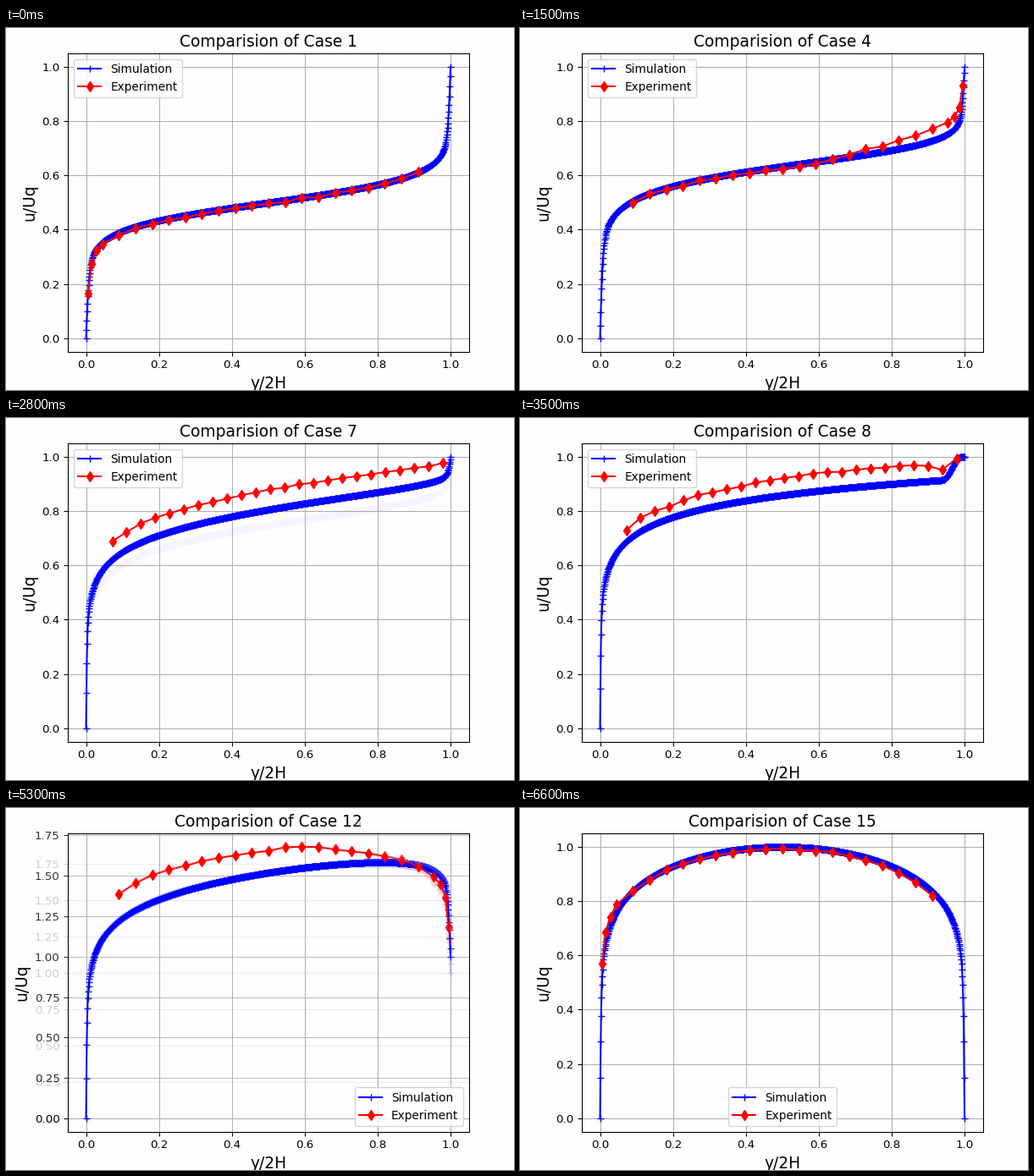
A matplotlib script that plays this animation: 600 by 428 pixels, repeating every 6700 ms.

```python
import numpy as np
import matplotlib.pyplot as plt
from matplotlib.animation import FuncAnimation

W, H, DPI = 600, 428, 96
FRAMES, STEP = 67, 100
CASES = 15
FIRST_CUT, PERIOD, FADE = 75, 440, 180  # ms
PAPER = "#fefdff"

# Key cases: core speed, core slope, then the experiment's
# deviation at the stations in BIAS_AT. Other cases lie in between.
BIAS_AT = [0, 0.1, 0.6, 0.9, 1]
KEYS = {
    1: (0.5, 0, -0.01, -0.006, -0.004, 0, 0),
    4: (0.654, 0, 0, -0.006, -0.006, 0.042, 0.05),
    7: (0.825, 0.055, 0.06, 0.066, 0.073, 0.068, 0.05),
    8: (0.92, 0, 0.03, 0.045, 0.064, 0.062, -0.01),
    10: (0.98, 0.12, 0.04, 0.072, 0.034, -0.03, 0),
    11: (1.165, 0.16, 0.06, 0.122, 0.1, 0.005, 0),
    12: (1.57, 0.21, 0.13, 0.168, 0.13, 0.004, -0.08),
    14: (1.95, 0.25, 0.16, 0.206, 0.159, 0.005, -0.1),
    15: (1.07, 0, 0.05, -0.005, -0.008, -0.018, 0),
}


def smoothstep(s):
    s = np.clip(s, 0, 1)
    return s * s * (3 - 2 * s)


def wall(y, lam):
    """Log-law layer rising from 0 at the wall to 1 at y = 1."""
    return (1 + 0.0957 * np.log(y + 1e-9)) * (1 - np.exp(-y / lam))


def simulation(k, y):
    a, c = params(k)[:2]
    lam = np.interp(k, [1, 4, 7], [0.0051, 0.0044, 0.0016])
    if k == CASES:  # channel flow, both walls at rest
        bulge = 4 * (1 - 0.868 * a) * y * (1 - y)
        return a * (wall(y, 0.0019) - 1 + wall(1 - y, 0.0019)) + bulge
    if k == 8:
        top = smoothstep((y - 0.94) / 0.05)
    else:
        top = 1 - wall(1 - y, 0.0045)
    return a * wall(y, lam) + c * y + (1 - a - c) * top


def params(k):
    return [np.interp(k, list(KEYS), col) for col in zip(*KEYS.values())]


def stations(k):
    if 6 <= k <= 8:
        return np.linspace(0.072, 0.978, 24)
    mid = np.linspace(0.09, 0.911, 19)
    if k in (3, 4, 5, 12, 13, 14):
        return np.r_[mid, 0.953, 0.973, 0.986, 0.995]
    return np.r_[0.006, 0.015, 0.028, 0.045, mid]


def experiment(k, y):
    return simulation(k, y) + np.interp(y, BIAS_AT, params(k)[2:])


def legend_place(k):
    if k <= 10:
        return "upper left"
    return "lower right" if k < CASES else "lower center"


plt.rcParams["font.family"] = "DejaVu Sans"
fig = plt.figure(figsize=(W / DPI, H / DPI), dpi=DPI, facecolor=PAPER)
LEFT, RIGHT, TOP, BOTTOM = 73, 546.6, 29.9, 382.9
BOX = [LEFT / W, 1 - BOTTOM / H, (RIGHT - LEFT) / W, (BOTTOM - TOP) / H]
rng = np.random.default_rng(4)


def make_case(k):
    ax = fig.add_axes(BOX, label=f"case {k}", facecolor=PAPER)
    # full-stage backing, so that a fade covers the whole picture
    ax.add_artist(plt.Rectangle((0, 0), 1, 1, transform=fig.transFigure,
                                color=PAPER, clip_on=False, zorder=-5))
    y = np.linspace(0, 1, 1001)
    u = simulation(k, y)
    ys = stations(k)
    us = experiment(k, ys)
    peak = max(u.max(), us.max())
    scatter = rng.normal(0, 0.002 * peak, ys.size)
    ax.plot(y, u, "b+-", label="Simulation")
    ax.plot(ys, us + scatter, "rd-", ms=6.5, label="Experiment")
    ax.set_ylim(-0.05 * peak, 1.05 * peak)
    ax.set_title(f"Comparision of Case {k}", fontsize=14)
    ax.set_xlabel("y/2H", fontsize=14)
    ax.set_ylabel("u/Uq", fontsize=14)
    ax.grid(True)
    ax.legend(loc=legend_place(k), fontsize=10.2)
    return ax


cases = [make_case(k) for k in range(1, CASES + 1)]


def group_alpha(a):
    return lambda img, dpi: (img * np.array([1, 1, 1, a]), 0, 0)


def shown(k, t):
    """Opacity of case k at time t; the first case is always underneath."""
    if k == 1:
        return 1.0
    cut = FIRST_CUT + PERIOD * (k - 1)
    return float(np.clip((t - cut) / FADE + 0.5, 0, 1))


def update(i):
    t = i * STEP
    for k, ax in enumerate(cases, 1):
        a = shown(k, t)
        covered = k < CASES and shown(k + 1, t) == 1
        ax.set_visible(a > 0 and not covered)
        ax.set_agg_filter(group_alpha(a) if a < 1 else None)
    return cases


anim = FuncAnimation(fig, update, frames=FRAMES, interval=STEP,
                     repeat=True, repeat_delay=0, blit=False)
plt.show()
```
